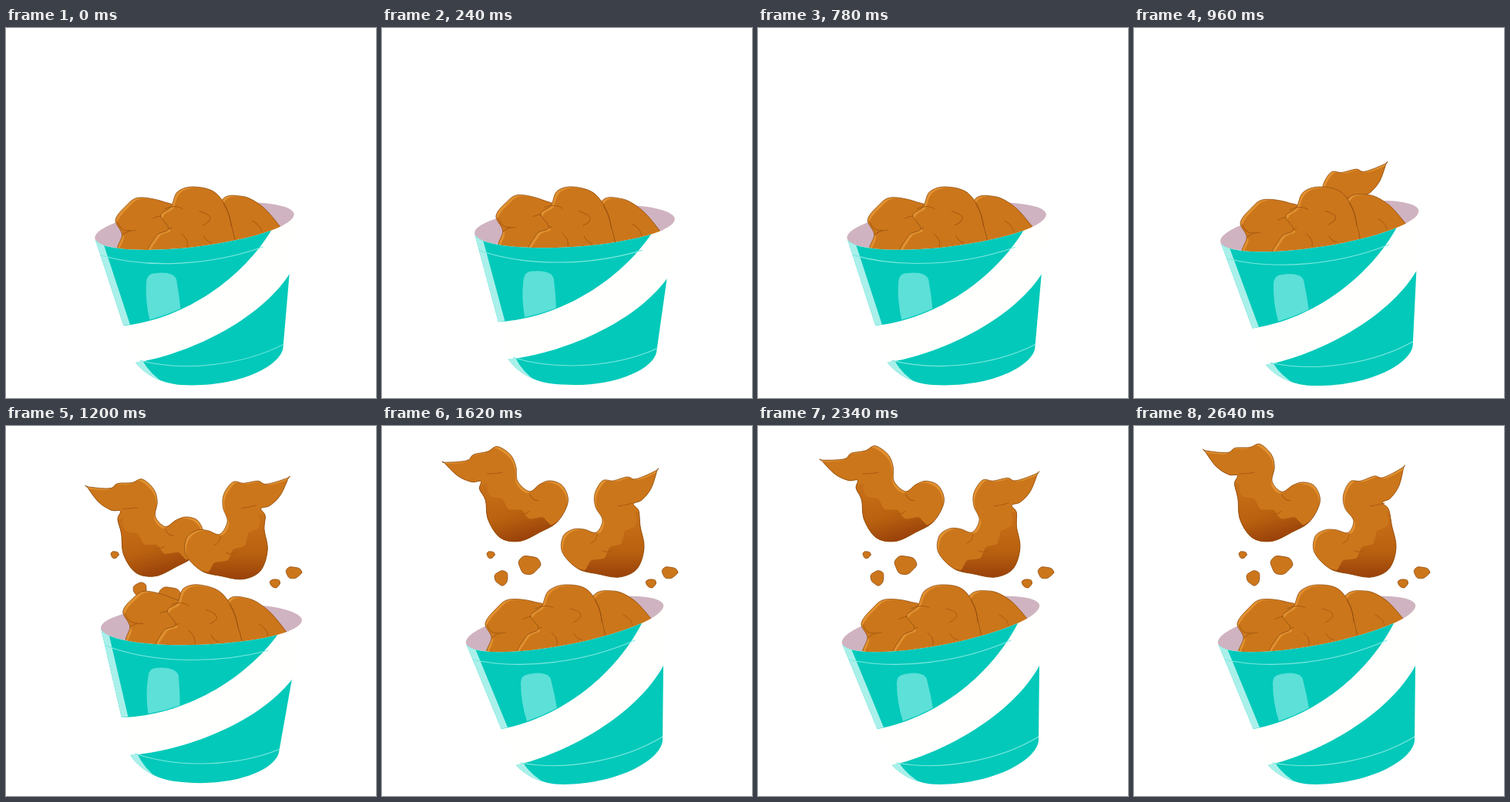
These frames come from a looping animation (480x480 px, 2700 ms). An HTML page with a canvas:

```html
<!DOCTYPE html>
<html>
<head>
<meta charset="utf-8">
<title>Bucket</title>
<style>
html, body { margin: 0; width: 100%; height: 100%; overflow: hidden; background: #fff; }
canvas { display: block; }
</style>
</head>
<body>
<canvas id="stage" width="480" height="480"></canvas>
<script>
const ctx = document.getElementById('stage').getContext('2d');
const LOOP = 2700, TAU = Math.PI * 2, DEG = Math.PI / 180;
const MEAT = '#cc761b', EDGE = '#8f4c10', CREASE = '#a85a10', SHINE = '#e0902f';
const TEAL = '#02c9ba', PALE = '#a9f0ea', GLOSS = '#5ce0d8', LINE = '#7ce8de', PINK = '#d0b3c0';

const smooth = v => { v = Math.max(0, Math.min(1, v)); return v * v * (3 - 2 * v); };
const wave = (t, peak, period) => Math.cos(TAU * (t - peak) / period);
const points = text => text.split(' ').map(p => p.split(',').map(Number));
const range = (n, make) => Array.from({ length: n }, (_, i) => make(i / n));

// Smooth closed curve through the points; a doubled point makes a corner.
function closedCurve(pts) {
  const path = new Path2D(), n = pts.length, at = i => pts[(i + n) % n];
  path.moveTo(...pts[0]);
  for (let i = 0; i < n; i++) {
    const [a, b, c, d] = [at(i - 1), at(i), at(i + 1), at(i + 2)];
    path.bezierCurveTo(b[0] + (c[0] - a[0]) / 6, b[1] + (c[1] - a[1]) / 6,
      c[0] - (d[0] - b[0]) / 6, c[1] - (d[1] - b[1]) / 6, c[0], c[1]);
  }
  path.closePath();
  return path;
}

function stroke(path, color, width) {
  ctx.strokeStyle = color;
  ctx.lineWidth = width;
  ctx.stroke(path);
}

function fill(path, color) {
  ctx.fillStyle = color;
  ctx.fill(path);
}

// Lit rim on the upper left, optional shade inside, then creases and outline.
function drawMeat(shape, { creases, shade, lit = true } = {}) {
  fill(shape, lit ? SHINE : MEAT);
  ctx.save();
  ctx.clip(shape);
  if (lit) {
    ctx.save();
    ctx.translate(2.2, 3.6);
    fill(shape, MEAT);
    ctx.restore();
    fill(bottomRight(shape), MEAT);
  }
  if (shade) shade();
  ctx.restore();
  if (creases) stroke(creases, CREASE, 1);
  stroke(shape, EDGE, 0.8);
}

function bottomRight(shape) {
  const path = new Path2D();
  path.addPath(shape, new DOMMatrix().translate(4, 1));
  return path;
}

const pieces = [
  ['140,300 142,274 134,256 148,237 165,225 197,228 215,240 215,300',
    'M142 275Q150 268 160 268M183 251Q190 246 200 247M136 258Q142 272 152 268'],
  ['265,290 272,224 300,214 327,226 350,251 350,251 320,290',
    'M313 245Q323 249 325 259'],
  ['180,305 186,274 203,263 193,246 207,234 216,214 238,206 267,213 284,246 281,300',
    'M203 263L207 261M199 237Q214 230 222 236M244 237Q270 243 248 255M220 268Q229 275 227 284M249 269Q252 276 259 277M276 226Q285 240 285 254']
].map(([outline, creases]) => ({ shape: closedCurve(points(outline)), creases: new Path2D(creases) }));

// Wing around its pivot; the second one is the mirror image, turned.
const wingOutline = points('57,-93 57,-93 49,-69 37,-54 26,-49 33,-40 35,-20 40,8 31,35 8,46 -20,42 -46,35 ' +
  '-66,14 -65,-7 -52,-16 -38,-16 -22,-12 -14,-28 -23,-45 -24,-62 -14,-79 0,-79 18,-84 27,-81 40,-85');
const wingCreases = new Path2D('M6 -46Q16 -47 25 -50M-29 2Q-22 0 -21 -9M0 11Q-8 15 -14 12');
const wingShade = closedCurve([
  ...range(16, u => {
    const push = 10 * Math.sin(Math.PI * u) + 3.5 * Math.sin(TAU * 4 * u);
    return [-46 + 84 * u + push * 0.7, 38 - 80 * u + push * 0.7];
  }),
  [70, -20], [60, 70], [-40, 70]
]);

const wings = [
  { x: 174, y: 103, turn: -16, flip: -1, arrive: 1300, from: [51, 155],
    swing: t => -6.2 + 5.6 * wave(t, 2575, 640) },
  { x: 300, y: 150, turn: 0, flip: 1, arrive: 1215, from: [-33, 117],
    swing: t => 0.6 + 5.6 * wave(t, 2729, 640) - 3 * smooth((1449 - t) / 250) }
];

// What is left of the way from the bucket, 0 once arrived.
const remaining = (t, arrive) => Math.pow(Math.max(0, (arrive - t) / 255), 1.3);

function drawWing(w, t) {
  const rise = remaining(t, w.arrive);
  if (rise > 1.7) return;
  const bent = wingOutline.map(([x, y]) => {
    const a = -w.swing(t) * DEG * smooth(-y / 50), c = Math.cos(a), s = Math.sin(a);
    return [x * c - y * s, x * s + y * c];
  });
  ctx.save();
  ctx.translate(w.x + w.from[0] * rise, w.y + w.from[1] * rise);
  ctx.rotate(w.turn * DEG);
  ctx.scale(w.flip, 1);
  const tone = ctx.createLinearGradient(0, -30, 0, 47);
  tone.addColorStop(0, '#c66e17');
  tone.addColorStop(0.55, '#b9610f');
  tone.addColorStop(1, '#98400a');
  drawMeat(closedCurve(bent), { creases: wingCreases, shade: () => fill(wingShade, tone) });
  ctx.restore();
}

const crumbs = [
  { x: 141, y: 167, w: 5, h: 4.5, arrive: 1180, from: [60, 80] },
  { x: 155, y: 197, w: 8.5, h: 9.5, arrive: 1290, from: [75, 60] },
  { x: 191, y: 180, w: 14, h: 12, arrive: 1370, from: [36, 69] },
  { x: 373, y: 190, w: 10, h: 7.5, arrive: 1180, from: [-75, 75] },
  { x: 349, y: 204, w: 6.5, h: 5.5, arrive: 1180, from: [-55, 60] }
];

function drawCrumb(c, t) {
  const rise = remaining(t, c.arrive);
  if (rise > 1) return;
  const x = c.x + c.from[0] * rise, y = c.y + c.from[1] * rise;
  const shape = closedCurve(range(9, u => {
    const r = 1 + 0.1 * Math.sin(TAU * 3 * u + c.x);
    return [x + c.w * r * Math.cos(TAU * u), y + c.h * r * Math.sin(TAU * u)];
  }));
  drawMeat(shape, { lit: false });
}

const rim = new Path2D();
rim.ellipse(237, 257, 130.5, 27, -0.19, 0, TAU);

const body = new Path2D();
body.ellipse(237, 257, 130.5, 27, -0.19, Math.PI, 0, true);
body.lineTo(365, 311);
body.lineTo(364, 408);
body.bezierCurveTo(362, 432, 310, 464, 235, 465);
body.bezierCurveTo(205, 465, 185, 452, 174, 440);
body.closePath();

// Painted areas, cut to the body's outline.
const paint = [
  ['M155 393C235 378 305 320 338 254L330 200H60V393Z', TEAL],
  ['M174 440C240 425 330 375 365 311H420V500H100Z', TEAL],
  ['M100 270L121 289L163 391L150 394Z', PALE],
  ['M170 441L183 437Q194 454 215 465L180 475Z', PALE],
  ['M180 334Q180 323 190 322Q204 319 212 322Q219 324 220 333Q224 348 227 366Q208 376 188 383Q180 358 180 334Z', GLOSS]
].map(([d, color]) => [new Path2D(d), color]);
const seams = new Path2D('M117 303C180 317 262 307 328 278M180 437C240 448 315 433 364 403');

// Tilts the drawing around the middle of the rim.
function tilted(k, lean, squash, draw) {
  ctx.save();
  ctx.translate(237 + 17 * k, 257);
  ctx.transform(1 - 0.014 * k, 0.155 * k, lean * k, 1 - squash * k, 0, 0);
  ctx.translate(-237, -257);
  draw();
  ctx.restore();
}

function drawFront() {
  fill(body, '#fffffd');
  ctx.save();
  ctx.clip(body);
  for (const [path, color] of paint) fill(path, color);
  stroke(seams, LINE, 1.1);
  ctx.restore();
}

function render(t) {
  const tilt = t > 1386 ? 0 : 0.57 * (1 - wave(t, -105, 497));
  ctx.clearRect(0, 0, 480, 480);
  tilted(tilt, -0.17, 0.02, () => fill(rim, PINK));
  wings.forEach(w => drawWing(w, t));
  crumbs.forEach(c => drawCrumb(c, t));
  tilted(tilt, 0.06, 0, () => pieces.forEach(p => drawMeat(p.shape, p)));
  tilted(tilt, -0.17, 0.02, drawFront);
}

ctx.lineJoin = ctx.lineCap = 'round';
const start = performance.now();
function tick() {
  render((performance.now() - start) % LOOP);
  requestAnimationFrame(tick);
}
tick();
</script>
</body>
</html>
```
